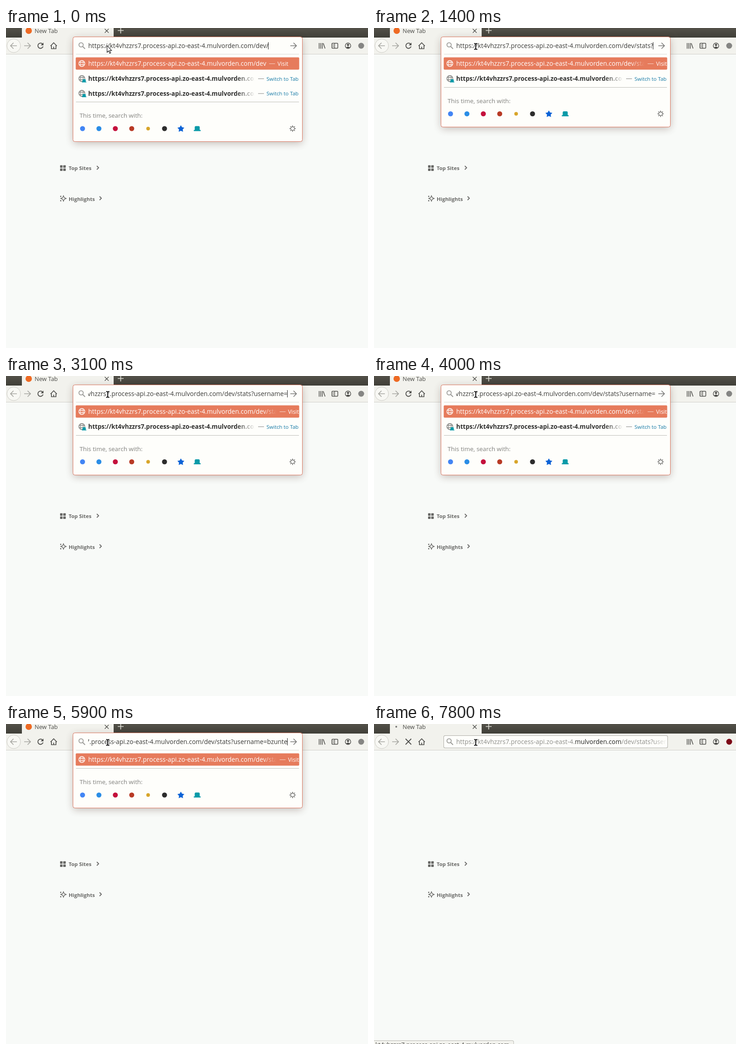
Write an HTML page with a canvas that moves like this. It is 797 by 703 pixels and loops after 8 s.

```html
<!DOCTYPE html>
<html lang="en">
<head>
<meta charset="utf-8">
<title>New Tab</title>
<style>
html, body { margin: 0; width: 100%; height: 100%; overflow: hidden; background: #f8faf8; }
canvas { display: block; }
</style>
</head>
<body>
<canvas id="stage" width="797" height="703"></canvas>
<script>
const ctx = document.getElementById('stage').getContext('2d');
const LOOP = 8000, LOAD = 6700;
const SUB = 'kt4vhzzrs7.process-api.zo-east-4.', DOMAIN = 'mulvorden.com';
const HOST = SUB + DOMAIN, BASE = 'https://' + HOST + '/dev/';
const DARK = '#4c4c49', GRAY = '#777775', BLUE = '#1579a5', TEAL = '#0a9aa8', PALE = '#a5a5a0';
const URL_SIZE = 13.94;

// Each entry holds from its time until the next one.
const typed = [
  [0, ''], [400, 's'], [500, 'st'], [600, 'sta'], [700, 'stat'], [1100, 'stats'], [1200, 'stats?'],
  [1900, 'stats?u'], [2100, 'stats?us'], [2200, 'stats?user'], [2400, 'stats?usern'],
  [2500, 'stats?userna'], [2600, 'stats?username'], [3100, 'stats?username='],
  [4800, 'stats?username=b'], [5300, 'stats?username=bz'], [5500, 'stats?username=bzu'],
  [5600, 'stats?username=bzun'], [5700, 'stats?username=bzunt'],
  [5900, 'stats?username=bzunte'], [6100, 'stats?username=bzuntel']
];
const FOUND = 'stats?username=tolverna';
const results = [
  [0, ['tab', 'tab']], [1100, [FOUND, 'stats']], [1200, [FOUND]], [1400, ['tab']], [4900, []]
];
const caretOff = [[1600, 1900], [2900, 3100], [4000, 4800], [5200, 5300], [6500, LOAD]];

const at = (track, t) => track.findLast(entry => entry[0] <= t)[1];

function font(size, bold) {
  ctx.font = `${bold ? 'bold ' : ''}${size}px "Open Sans", "Noto Sans", sans-serif`;
}
function text(str, x, y, color, size, bold) {
  font(size, bold);
  ctx.fillStyle = color;
  ctx.fillText(str, x, y);
  return ctx.measureText(str).width;
}
function rect(x, y, w, h, color, r = 0) {
  ctx.fillStyle = color;
  ctx.beginPath();
  ctx.roundRect(x, y, w, h, r);
  ctx.fill();
}
function outline(x, y, w, h, color, r = 0, width = 1) {
  ctx.strokeStyle = color;
  ctx.lineWidth = width;
  ctx.beginPath();
  ctx.roundRect(x, y, w, h, r);
  ctx.stroke();
}
function dot(x, y, r, color) {
  ctx.fillStyle = color;
  ctx.beginPath();
  ctx.arc(x, y, r, 0, 7);
  ctx.fill();
}
function ring(x, y, rx, color, width = 1.5, ry = rx) {
  ctx.strokeStyle = color;
  ctx.lineWidth = width;
  ctx.beginPath();
  ctx.ellipse(x, y, rx, ry, 0, 0, 7);
  ctx.stroke();
}
// Strokes the path, or fills it when width is 0.
function path(d, color, width = 1.6, x = 0, y = 0, scale = 1) {
  ctx.save();
  ctx.translate(x, y);
  ctx.scale(scale, scale);
  ctx.strokeStyle = ctx.fillStyle = color;
  ctx.lineWidth = width;
  if (width) ctx.stroke(new Path2D(d));
  else ctx.fill(new Path2D(d));
  ctx.restore();
}
function clipped(x, y, w, h, draw) {
  ctx.save();
  ctx.beginPath();
  ctx.rect(x, y, w, h);
  ctx.clip();
  draw();
  ctx.restore();
}
// Draws text that fades out at the limit; returns the width it takes up.
function fading(str, x, y, limit, color, size, bold, fade = 30) {
  font(size, bold);
  const width = ctx.measureText(str).width;
  if (width <= limit) return text(str, x, y, color, size, bold);
  const paint = ctx.createLinearGradient(x + limit - fade, 0, x + limit, 0);
  paint.addColorStop(0, color);
  paint.addColorStop(1, color + '00');
  clipped(x, y - 20, limit, 30, () => text(str, x, y, paint, size, bold));
  return limit;
}
function star(x, y, outer, inner, points) {
  let d = '';
  for (let i = 0; i < points * 2; i++) {
    const a = i * Math.PI / points - Math.PI / 2, r = i % 2 ? inner : outer;
    d += `${i ? 'L' : 'M'}${x + r * Math.cos(a)} ${y + r * Math.sin(a)}`;
  }
  return d + 'Z';
}

function globe(x, y, color) {
  ring(x, y, 6.6, color, 1.3);
  ring(x, y, 3, color, 1.1, 6.6);
  path('M-6 -2.4H6M-6 2.4H6', color, 1.1, x, y);
}
function tabIcon(x, y, scale = 1) {
  path('M-5.5 3V-3Q-5.5 -5.5 -3 -5.5H3Q5.5 -5.5 5.5 -3V3H7.5V5.5H-7.5V3Z', TEAL, 0, x, y, scale);
}
function gear(x, y) {
  ring(x, y, 4, GRAY, 1.4);
  for (let i = 0; i < 8; i++) {
    const c = Math.cos(i * Math.PI / 4), s = Math.sin(i * Math.PI / 4);
    path(`M${4 * c} ${4 * s}L${7 * c} ${7 * s}`, GRAY, 1.6, x, y);
  }
}
function magnifier() {
  ring(165.3, 37, 4.7, '#9a9a97', 1.8);
  path('M168.8 40.5L174 45.8', '#9a9a97', 2);
}

function drawChrome(loading, t) {
  rect(0, 0, 797, 703, '#f8faf8');
  const bar = ctx.createLinearGradient(0, 0, 0, 21);
  bar.addColorStop(0, '#535149');
  bar.addColorStop(1, '#403f38');
  rect(0, 0, 797, 21, bar);
  rect(0, 21, 797, 36, '#f2f2ed');
  rect(0, 57, 797, 1, '#d0cfca');
  rect(35, 0, 202, 21, '#f2f2ed');

  if (loading) {
    const step = Math.floor(t / 100) * 100;
    dot(50.5 + 5.5 * Math.sin((step - 7800) / 1050 * 2 * Math.PI - 0.28), 6, 2, GRAY);
  } else {
    dot(50, 6, 7, '#ee6a24');
  }
  text('New Tab', 63, 10.5, '#4a4a47', 12.8);
  path('M217.5 2L226 10.5M226 2L217.5 10.5', DARK, 1.4);
  path('M246 5.5H259M252.5 -1V12', '#deddd5', 1.7);

  dot(17, 39, 15, '#f8f8f4');
  ring(17, 39, 15, '#cbcac4', 1);
  path('M24 39H10.5M16.5 32.5L10 39L16.5 45.5', PALE, 1.7);
  path('M40 39H53M47.5 32.5L54 39L47.5 45.5', PALE, 1.7);
  if (loading) {
    path('M69.5 32.5L82 45M82 32.5L69.5 45', DARK, 1.8);
  } else {
    path('M80.5 35.2A5.8 5.8 0 1 0 81.6 40.5', DARK, 1.9);
    path('M82.5 32V38H76.5Z', DARK, 0);
  }
  path('M98 39.5L105 32.5L112 39.5M100 38.5V45.5H110V38.5M105 45V41', DARK, 1.7);

  path('M689.5 33V45.5M693 33V45.5M696.5 33V45.5M698.5 33.5L702.5 45', DARK, 1.5);
  outline(717.5, 33.5, 13, 11, DARK, 1.5, 1.5);
  path('M723.5 33V45M719.5 36.5H722M719.5 39H722M719.5 41.5H722', DARK, 1.2);
  ring(753, 39, 6, DARK, 1.4);
  dot(753, 37.2, 2.4, DARK);
  path('M749 43Q753 38.5 757 43Q753 46 749 43Z', DARK, 0);
  dot(782, 39, 6.5, loading ? '#7c0716' : '#858583');
}

function drawPage() {
  for (const x of [119, 126]) for (const y of [301.5, 308.5]) rect(x, y, 5.6, 5.6, '#686866', 0.8);
  text('Top Sites', 138, 312, '#686866', 11.4, true);
  path('M200 303L204 307L200 311', '#686866', 1.8);
  path(star(126.5, 374.5, 6, 2.6, 4), '#686866', 1.4);
  dot(120.5, 370, 1.4, '#686866');
  dot(120.5, 379.5, 1.4, '#686866');
  text('Highlights', 138, 379.5, '#686866', 11.4, true);
  path('M206 370L210 374L206 378', '#686866', 1.8);
}

function drawResult(kind, y) {
  globe(167, y, GRAY);
  if (kind === 'tab') {
    tabIcon(172, y + 5, 0.65);
    fading(BASE, 181, y + 5, 367, '#2f2f2e', 13.55, true, 42);
    rect(555, y, 13, 1, '#858583');
    text('Switch to Tab', 573.5, y + 4.5, BLUE, 11.5);
    return 32.5;
  }
  fading(BASE + kind, 181, y + 5, 464, '#2f2f2e', 13.55, true);
  text(HOST + '/dev/' + kind, 182, y + 21, BLUE, 11.75);
  return 49;
}

function drawPopup(t) {
  const entry = BASE + at(typed, t), rows = at(results, t);
  const bottom = 184 + rows.reduce((sum, kind) => sum + (kind === 'tab' ? 32.5 : 49), 0);
  const edge = Math.round(bottom);

  ctx.save();
  ctx.shadowColor = 'rgba(60, 30, 20, .3)';
  ctx.shadowBlur = 17;
  ctx.shadowOffsetY = 4;
  rect(148, 20, 504, edge - 20, '#fefefb', 4);
  ctx.restore();
  outline(147.5, 19.5, 505, edge - 19, '#dc7660', 4);

  magnifier();
  font(URL_SIZE);
  const width = ctx.measureText(entry).width, end = Math.min(181 + width, 619.5);
  clipped(181, 25, 440, 30, () => text(entry, end - width, 44, '#3c3c3a', URL_SIZE));
  if (!caretOff.some(([from, to]) => t >= from && t < to)) rect(Math.floor(end), 31, 1, 16, '#222');
  path('M626 39H639M633 32.5L639.5 39L633 45.5', GRAY, 1.6);
  rect(154, 57, 491, 1, '#d9d9d5');

  rect(153.5, 64.5, 492, 27, '#e67b5c', 2);
  globe(167, 78, '#ffffff');
  const shown = t < 100 ? entry.slice(0, -1) : entry;
  const dash = 181 + fading(shown, 181, 83, 415, '#ffffff', URL_SIZE) + 6.5;
  rect(dash, 78, 13, 1, '#f8d5ca');
  text('Visit', dash + 18.5, 83, '#ffffff', 12.3);

  let y = 111;
  for (const kind of rows) y += drawResult(kind, y);

  rect(154, Math.round(bottom - 87), 491, 1, '#bdbdb9');
  text('This time, search with:', 162, bottom - 52, '#80807d', 13.4);
  const iconY = bottom - 28;
  ['#4285f4', '#2a8de6', '#c4103c', '#b83a25', '#d8a52a', '#2c2c2c'].forEach((color, i) =>
    dot(168.5 + i * 36.1, iconY, i === 4 ? 4 : 5.5, color));
  path(star(385, iconY + 0.5, 8, 4.3, 5), '#0b62d6', 0);
  tabIcon(421, iconY);
  gear(631, iconY);
}

function drawLoading(t) {
  rect(153, 25, 494, 28, '#aeada7', 3.5);
  rect(154, 26, 492, 26, '#fefefb', 3);
  magnifier();
  const lead = 'https://' + SUB, soft = '#8e8e8b';
  const x = 181 + text(lead, 181, 44, soft, URL_SIZE);
  const tailX = x + text(DOMAIN, x, 44, '#252524', URL_SIZE);
  fading('/dev/' + typed.at(-1)[1], tailX, 44, 645 - tailX, soft, URL_SIZE);
  if (t >= 7000) {
    rect(-5, 695, 313, 20, '#bcbbb5', 4);
    rect(-5, 696, 312, 20, '#f2f2ed', 3);
    text(HOST, 3, 709, '#3c3c3a', 13);
  }
}

function drawPointer(t) {
  if (t < 100) {
    const arrow = 'M222.5 38.5V53.5L226 50.3L228.3 55.8L230.6 54.8L228.3 49.5H232.5Z';
    path(arrow, '#ffffff', 2.5);
    path(arrow, '#ffffff', 0);
    path(arrow, '#111111', 1.1);
  } else {
    const beam = 'M220.5 34Q224 34 224 36Q224 34 227.5 34M224 36V45M220.5 47Q224 47 224 45Q224 47 227.5 47';
    path(beam, '#ffffff', 3.6);
    path(beam, '#111111', 2);
  }
}

function frame() {
  const t = performance.now() % LOOP, loading = t >= LOAD;
  drawChrome(loading, t);
  drawPage();
  (loading ? drawLoading : drawPopup)(t);
  drawPointer(t);
  requestAnimationFrame(frame);
}
frame();
</script>
</body>
</html>
```
